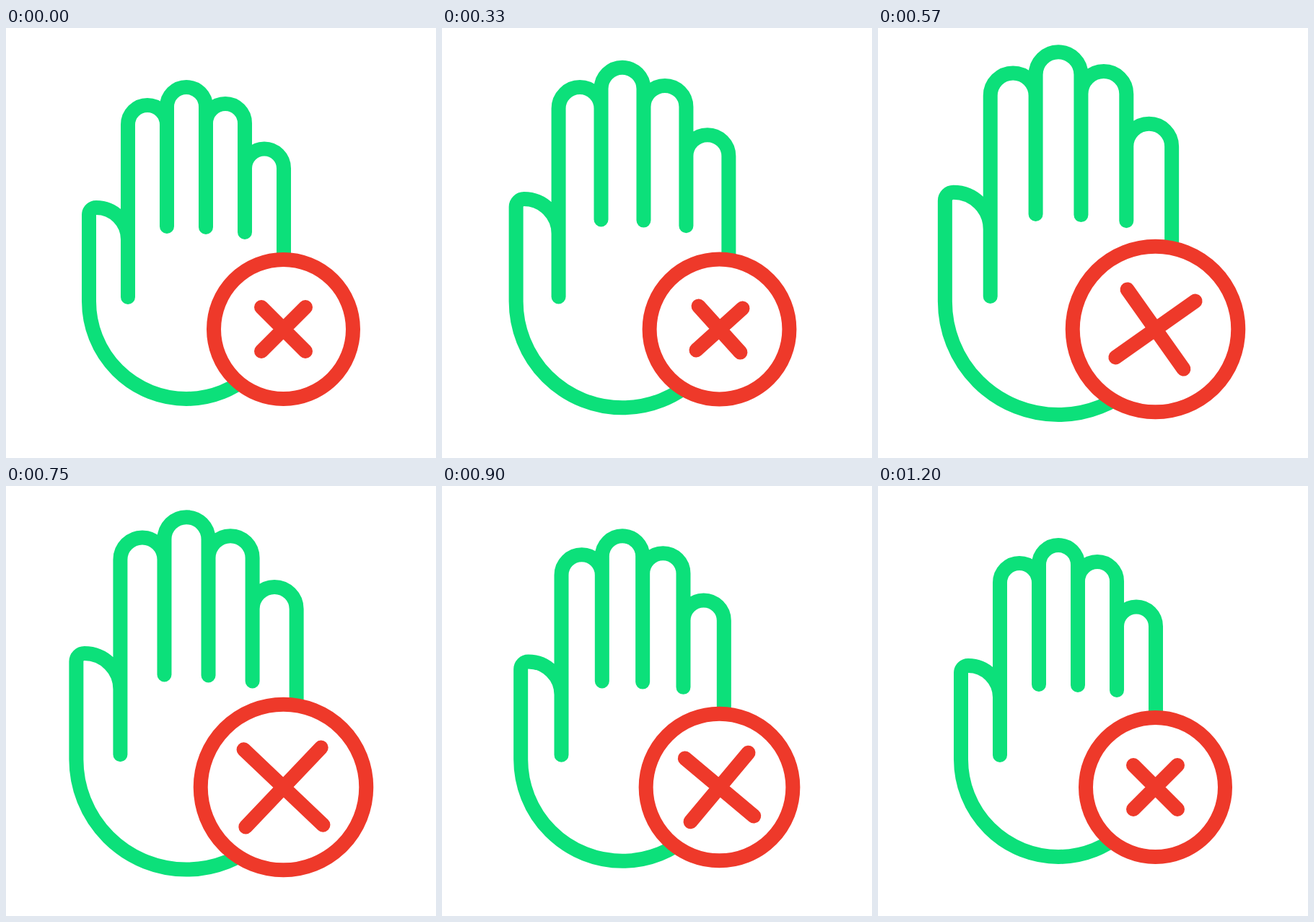
Animation, 596 px wide and 596 px high, one loop 1.41 s. Source, as an HTML page:

```html
<!DOCTYPE html>
<html lang="en">
<head>
<meta charset="utf-8">
<title>Hand declined</title>
<style>
  html, body { margin: 0; height: 100%; overflow: hidden; background: #fff; }
  svg { display: block; }
  path, circle {
    fill: none;
    stroke-width: 20;
    stroke-linecap: round;
    stroke-linejoin: round;
    vector-effect: non-scaling-stroke;
  }
  #hand { stroke: #0ce07a; }
  #ring { stroke: #ee392a; fill: #fff; }
  #cross { stroke: #ee392a; }
</style>
</head>
<body>
<svg width="596" height="596">
  <path id="hand" d="
    M169 373V134a27 27 0 0 1 54 0V275
    M223 134V109a27 27 0 0 1 54 0V276
    M277 132a27 27 0 0 1 54 0V283
    M331 194.5a27 27 0 0 1 54 0V379a135 135 0 0 1-270 0V259a10 10 0 0 1 10-10a44 44 0 0 1 44 44"/>
  <circle id="ring" cx="384.5" cy="417.5" r="96.5"/>
  <path id="cross" d="M-30.5-30.5l61 61M30.5-30.5l-61 61"/>
</svg>
<script>
const LOOP = 1410, STEP = 30;
const [hand, ring, cross] = ['hand', 'ring', 'cross'].map(id => document.getElementById(id));

// Each track is a list of [time in ms, value] keys.
const handScale = [[60, 1], [570, 1.164], [580, 1.164], [1090, 1]];
const ringRadius = [[290, 96.5], [630, 115.7], [690, 115.7], [1030, 96.5]];
const crossScale = [[324, 1], [716, 1.765], [1116, 1]];
const crossAngle = [[200, 0], [535, 10], [870, -5.1], [1200, 0]];

// cubic-bezier(.5, 0, .5, 1), solved by bisection
function ease(x) {
  let low = 0, high = 1;
  for (let i = 0; i < 20; i++) {
    const s = (low + high) / 2;
    if (1.5 * s * (1 - s) + s ** 3 < x) low = s; else high = s;
  }
  return low * low * (3 - 2 * low);
}

function valueAt(track, t) {
  const next = track.findIndex(([time]) => time > t);
  if (next === 0) return track[0][1];
  if (next < 0) return track[track.length - 1][1];
  const [t0, v0] = track[next - 1], [t1, v1] = track[next];
  return v0 + (v1 - v0) * ease((t - t0) / (t1 - t0));
}

function draw(now) {
  const t = Math.floor(now % LOOP / STEP) * STEP;
  hand.setAttribute('transform',
    `translate(250 379) scale(${valueAt(handScale, t)}) translate(-250 -379)`);
  ring.setAttribute('r', valueAt(ringRadius, t));
  cross.setAttribute('transform',
    `translate(384.5 417.5) rotate(${valueAt(crossAngle, t)}) scale(${valueAt(crossScale, t)})`);
}

let start;
function tick(now) {
  start ??= now;
  draw(now - start);
  requestAnimationFrame(tick);
}
draw(0);
requestAnimationFrame(tick);
</script>
</body>
</html>
```
